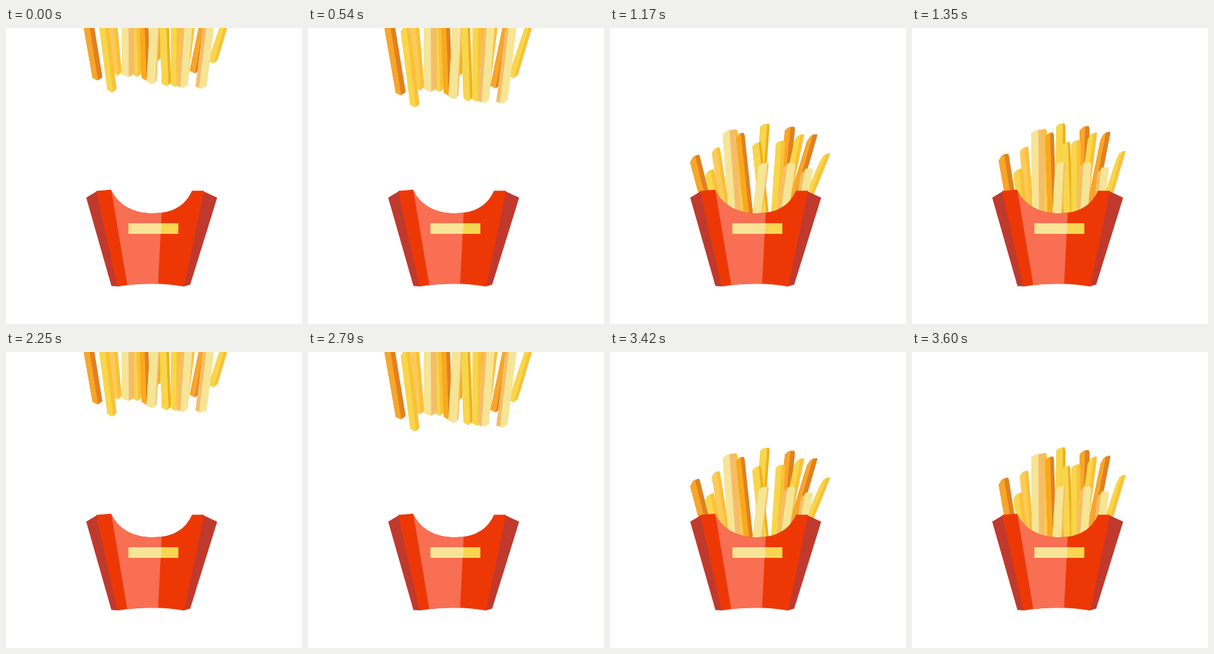
An HTML page with a canvas that plays this animation: 417x417 px, repeating every 4500 ms.

```html
<!DOCTYPE html>
<html lang="en">
<head>
<meta charset="utf-8">
<title>Fries</title>
<style>
  html, body { margin: 0; width: 100%; height: 100%; overflow: hidden; background: #fff; }
  canvas { display: block; width: 100vw; height: 100vh; }
</style>
</head>
<body>
<canvas id="stage"></canvas>
<script>
const SIZE = 417, LOOP = 2250, STEP = 30;
const START = 300, LAND = 1039, PEAK = 1140, END = 1350;
const MID = 0.46;    // fall progress at which the fry points are given
const DROP = 120;    // way left to fall from there
const CENTER = 200;  // the fries drift towards this line

const canvas = document.getElementById('stage');
const ctx = canvas.getContext('2d');
const ratio = window.devicePixelRatio || 1;
canvas.width = canvas.height = Math.round(SIZE * ratio);

// Each kind has two faces, the share of the left one, and a width.
const kind = (left, right, split, width) => ({ left, right, split, width });
const orange = kind('#f7a62a', '#e2801e', 0.54, 14);
const amber = kind('#faa81f', '#e2801e', 0.55, 12);
const yellow = kind('#f8d64b', '#fbc135', 0.6, 13);
const lemon = kind('#f8d64b', '#f0b01c', 0.72, 13);
const honey = kind('#fcca5b', '#fbc033', 0.6, 12);
const cream = kind('#f6e596', '#f6bd68', 0.87, 14);
const wheat = kind('#f6e596', '#f6bd68', 0.54, 18);
const peach = kind('#f6bd68', '#f6e596', 0.32, 16);

// From back to front: kind, tip, base.
const fries = [
  [lemon, [211, 14], [210, 150]],
  [orange, [249.5, 18], [245, 170]],
  [orange, [283, 26], [257, 166]],
  [yellow, [308, 53], [280, 152]],
  [lemon, [219, 40], [224, 184]],
  [yellow, [235.5, 38], [235, 185]],
  [yellow, [262, 27], [243, 182]],
  [peach, [251, 69], [243, 187]],
  [peach, [279.5, 76], [266.5, 188]],
  [orange, [119, 57], [137.5, 176]],
  [honey, [152, 47], [162, 169]],
  [yellow, [142, 78], [155.5, 193]],
  [yellow, [181, 22], [187, 171]],
  [wheat, [174, 23], [175, 171]],
  [amber, [193, 27], [198, 176]],
  [cream, [210, 68], [204, 181]]
];

const clamp = x => Math.min(1, Math.max(0, x));
const smooth = x => (1 - Math.cos(Math.PI * clamp(x))) / 2;
const fall = t => Math.pow(clamp((t - START) / (LAND - START)), 2.1);
const spread = t => 1.08 * (t < PEAK
  ? smooth((t - LAND + 15) / (PEAK - LAND + 15))
  : 1 - smooth((t - PEAK) / (END - PEAK)));

function poly(color, points) {
  ctx.beginPath();
  points.forEach(p => ctx.lineTo(p[0], p[1]));
  ctx.closePath();
  ctx.fillStyle = color;
  ctx.fill();
}

function drawFry([look, [tx, ty], [bx, by]], progress, wobble) {
  const w = look.width, tilt = tx - bx;
  const slant = Math.abs(tilt) * 0.25;
  const low = 5 + slant, high = Math.max(1, 5 - slant);
  const top = (u, y) => [tx + (u - 0.5) * w, ty + y];
  const bottom = (u, y) => [bx + (u - 0.5) * w, by - y];

  const left = [bottom(0, 3.5), top(0, low), top(0.3, low * 0.35), top(look.split, low * 0.1)];
  const right = [top(0.9, 0), top(1, high), bottom(1, 4.5), bottom(0.55, 0)];
  const inner = [bottom(look.split, 1), bottom(0.45, 0)];

  const shift = (progress - MID) / (1 - MID);
  const splay = Math.sign(tilt) * 3.6 + tilt * 0.06;
  ctx.save();
  ctx.translate(bx + (CENTER - tx) * 0.125 * shift, by + DROP * shift);
  ctx.rotate(splay * wobble * Math.PI / 180);
  ctx.translate(-bx, -by);
  poly(look.right, left.concat(right));
  poly(look.left, left.concat(inner));
  ctx.restore();
}

function drawBox() {
  poly('#c0392d', [[113, 239], [128, 230], [158, 364], [148.5, 363.5]]);
  poly('#c0392d', [[278, 230], [297.5, 239], [259.5, 361.5], [250, 364.3]]);

  ctx.save();
  ctx.beginPath();
  ctx.moveTo(127, 229.5);
  ctx.lineTo(148, 227.7);
  ctx.bezierCurveTo(158, 250, 180, 261, 207, 261);
  ctx.bezierCurveTo(235, 261, 253, 250, 262, 229.3);
  ctx.lineTo(279, 229.3);
  ctx.lineTo(251, 364.3);
  ctx.quadraticCurveTo(205, 356, 157, 364.3);
  ctx.closePath();
  ctx.fillStyle = '#ed3806';
  ctx.fill();
  ctx.clip();
  poly('#f86f53', [[148, 226], [221, 226], [214, 366], [171.5, 366]]);
  ctx.restore();

  poly('#f8d651', [[172.6, 275], [242.8, 275], [242.8, 290], [172.6, 290]]);
  poly('#f8e497', [[172.6, 275], [219, 275], [218.2, 290], [172.6, 290]]);
}

function draw(now) {
  const t = Math.floor((now % LOOP) / STEP) * STEP;
  ctx.setTransform(canvas.width / SIZE, 0, 0, canvas.height / SIZE, 0, 0);
  ctx.fillStyle = '#fff';
  ctx.fillRect(0, 0, SIZE, SIZE);
  const progress = fall(t), wobble = spread(t);
  fries.forEach(f => drawFry(f, progress, wobble));
  drawBox();
}

const begin = performance.now();
function tick() {
  draw(performance.now() - begin);
  requestAnimationFrame(tick);
}
tick();
</script>
</body>
</html>
```
